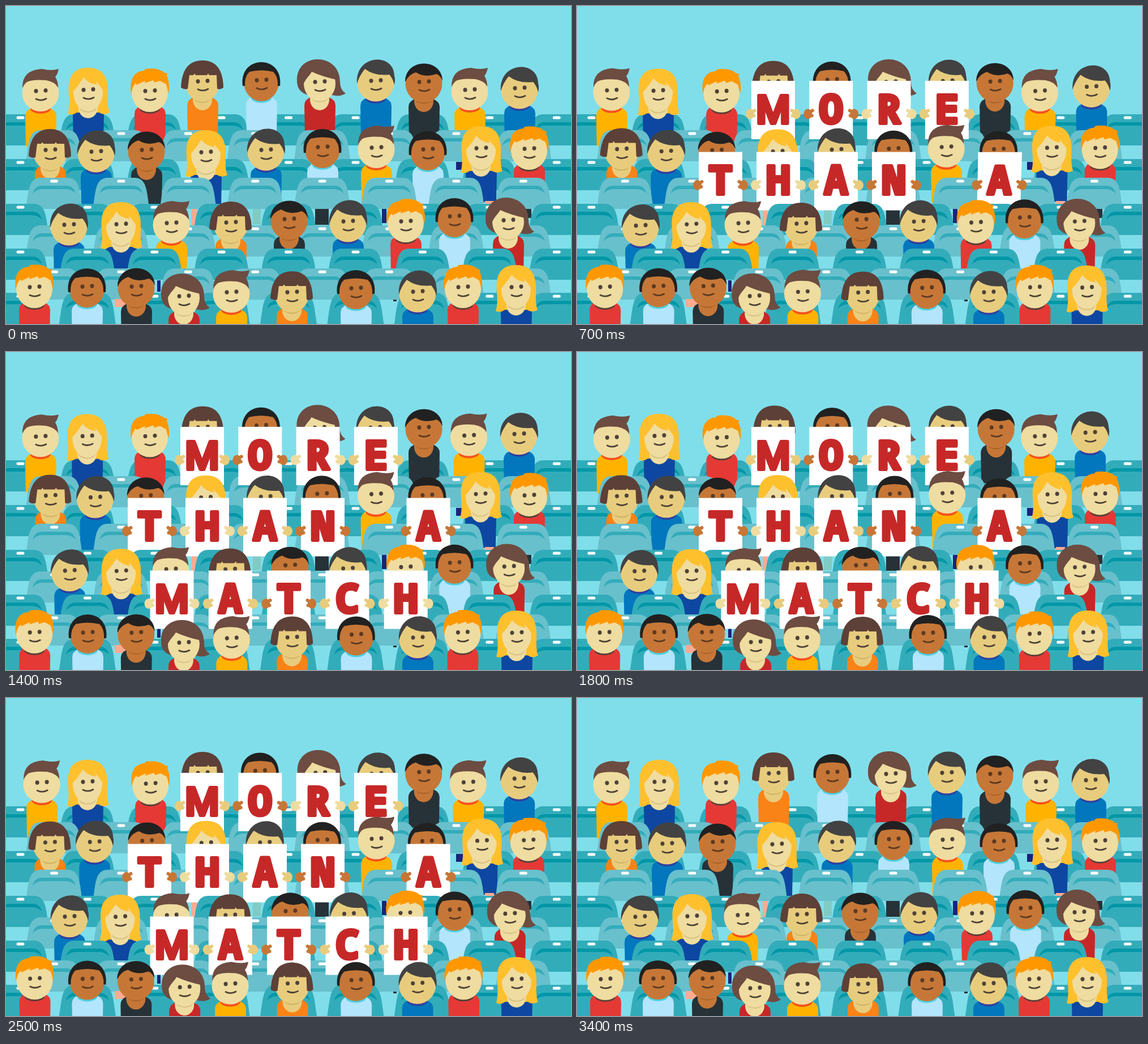
Write an HTML page that moves like this. It is 998 by 561 pixels and loops after 3.5 s.

```html
<!DOCTYPE html>
<html lang="en">
<head>
<meta charset="utf-8">
<title>Crowd with letter cards</title>
<style>
  html, body { margin: 0; width: 100%; height: 100%; overflow: hidden; background: #80deea; }
  svg { display: block; width: 100vw; height: 100vh; }
  text {
    font: bold 70px "Noto Sans Mono", monospace; text-anchor: middle;
    fill: #c62828; stroke: #c62828; stroke-width: 6; stroke-linejoin: round;
  }
  text.wide { font: 500 69px Roboto, sans-serif; }
</style>
</head>
<body>
<svg id="stage" viewBox="0 0 998 561"></svg>
<script>
const LOOP = 3500, STEP = 100, WOBBLE_LOOP = 3400, MID = 499;
const stage = document.getElementById('stage');

function add(parent, tag, attrs = {}) {
  const el = document.createElementNS('http://www.w3.org/2000/svg', tag);
  for (const key in attrs) el.setAttribute(key, attrs[key]);
  parent.appendChild(el);
  return el;
}
const path = (g, d, fill) => add(g, 'path', { d, fill });
const rect = (g, x, y, width, height, fill, rx = 0) => add(g, 'rect', { x, y, width, height, fill, rx });
const oval = (g, cx, cy, rx, ry, fill) => add(g, 'ellipse', { cx, cy, rx, ry, fill });

const PALE = '#efdca0', TAN = '#e8cc7e', BROWN = '#c67737';
const SHADE = { [PALE]: '#d8c182', [TAN]: '#cfb060', [BROWN]: '#a9622a' };

// Each look: face ellipse [cy, rx, ry], hair in front, optional hair behind, collar or bare neck.
const LOOKS = {
  swoop: {
    skin: PALE, hair: '#6d4c41', shirt: '#ffb300', collar: '#f4511e', face: [0, 32.5, 33],
    front: 'M-32-8Q-33-40 2-42Q20-38 32-42Q30-32 26-28Q31-20 31-9Q26-19 10-22Q-14-24-24-19Q-29-15-32-8Z'
  },
  blonde: {
    skin: PALE, hair: '#ffc02e', shirt: '#0d47a1', face: [3, 26, 35],
    back: 'M0-39C32-39 36-15 35 10Q34 32 38 40Q28 46 20 40H-20Q-28 46-36 42Q-32 30-34 8C-36-15-32-39 0-39Z',
    front: 'M-28 4Q-18-6-8-22Q0-11 16-9L13-16Q23-5 28 4Q31-37 0-37Q-31-37-28 4Z'
  },
  ginger: {
    skin: PALE, hair: '#ff9800', shirt: '#e53935', collar: '#5d4037', face: [4, 32, 34],
    front: 'M-33 6C-37-25-24-34-10-35L-8-38Q16-41 26-31L31-30L30-26Q36-12 33 5L29-11L18-17L8-14L6-18L-9-13L-8-17L-23-10L-25-13Q-31-6-33 6Z'
  },
  bob: {
    skin: TAN, hair: '#5d4037', shirt: '#f98316', face: [2, 30, 33],
    front: 'M-38 10Q-36-38 0-38Q36-38 37 10Q32 14 26 12L25-12H12L10-15L8-12H-12L-14-15L-16-12H-23L-26 12Q-32 14-38 10Z'
  },
  short: {
    skin: BROWN, hair: '#212121', shirt: '#b3e5fc', collar: '#4dd0e1', face: [1, 31, 34],
    front: 'M-33 8C-40-48 40-48 33 8L29 8Q30-8 21-17Q0-22-21-17Q-30-8-29 8Z'
  },
  wavy: {
    skin: PALE, hair: '#6d4c41', shirt: '#c62828', face: [3, 28, 31],
    back: 'M-40-2C-42-53 36-53 36 0Q36 14 46 20Q36 27 22 23H-20Q-40 18-40-2Z',
    front: 'M-30 8C-26-6-18-10-14-18Q6-9 30-4Q30-30 0-33Q-34-30-30 8Z'
  },
  sweep: {
    skin: TAN, hair: '#424242', shirt: '#0277bd', collar: '#303f9f', face: [0, 32.5, 33.5],
    front: 'M-33 2C-37-50 32-54 33-12Q35-5 33 4Q30-8 24-14Q-2-11-19-24Q-29-12-33 2Z'
  },
  crop: {
    skin: BROWN, hair: '#212121', shirt: '#263238', face: [0, 32.5, 33.5],
    front: 'M-33-3C-33-46 32-46 33-5Q29-15 22-17Q2-10-14-20Q-26-17-33-3Z'
  }
};

const ROWS = [
  'swoop 61 153, blonde 145 148, ginger 254 149, bob 347 134, short 451 133, wavy 554 134, sweep 653 135, crop 738 137, swoop 819 151, sweep 907 148',
  'bob 78 255, sweep 159 260, crop 248 257, blonde 353 258, sweep 459 257, short 559 251, swoop 654 253, short 745 255, blonde 839 251, ginger 924 251',
  'sweep 111 389, blonde 203 385, swoop 292 386, bob 397 383, crop 500 379, sweep 604 383, ginger 706 379, short 792 373, wavy 887 378',
  'ginger 50 495, short 143 497, crop 230 498, wavy 314 512, swoop 398 508, bob 505 506, short 618 500, sweep 727 507, ginger 807 495, blonde 901 496'
];

const kids = [], cards = [];

function drawKid(look, x, y) {
  const { skin, hair, shirt, collar, face, front, back } = LOOKS[look];
  const [cy, rx, ry] = face;
  const g = add(stage, 'g');
  path(g, 'M-26 95L-27 42Q-27 32-18 28H18Q28 32 28 42L27 95Z', shirt);
  if (back) path(g, back, hair);
  if (collar) oval(g, 0, cy + 28, 18, 9, collar);
  else {
    oval(g, 0, 31, 17, 19, skin);
    oval(g, 0, cy + ry - 7, 15, 9, SHADE[skin]);
  }
  oval(g, 0, cy, rx, ry, skin);
  path(g, front, hair);
  const ink = skin === BROWN ? '#5b3a22' : '#4e4238';
  oval(g, -8, cy - 3, 3.5, 3.7, ink);
  oval(g, 9, cy - 4, 3.5, 3.7, ink);
  add(g, 'path', { d: `M-8 ${cy + 11}q9 4.5 18-.5`, fill: 'none', stroke: ink, 'stroke-width': 2.8, 'stroke-linecap': 'round' });
  kids.push({ g, x, y, seed: kids.length * 6 + 1 });
}

function drawKids(row) {
  for (const kid of ROWS[row].split(', ')) {
    const [look, x, y] = kid.split(' ');
    drawKid(look, +x, +y);
  }
}

function drawSeats(top, dark) {
  const [fill, arc] = dark ? ['#33acba', '#0097a7'] : ['#68c0cc', '#33acba'];
  for (let x = dark ? 25.5 : 85; x < 1000; x += 118.4) {
    const g = add(stage, 'g', { transform: `translate(${x} ${top})` });
    path(g, 'M-50 55C-45 24-46 0-23 0H23C46 0 45 24 50 55Z', fill);
    path(g, 'M-38 28Q-34 14-22 14H22Q34 14 38 28Q31 20 20 20H-20Q-31 20-38 28Z', arc);
    rect(g, -7, 3.5, 14, 5, '#fff', 2.5);
  }
}

function drawCards(word, x0, gap, cy, start, skins) {
  [...word].forEach((letter, i) => {
    if (letter === ' ') return;
    const g = add(stage, 'g'), skin = skins[i];
    const sheet = add(g, 'polygon', { fill: '#fff' });
    const glyph = add(g, 'text', { y: 23, class: letter === 'M' ? 'wide' : '' });
    glyph.textContent = letter;
    const hands = [-1, 1].map(side => {
      const hand = add(g, 'g');
      oval(hand, side * 41, 0, 7.5, 9, skin);
      add(hand, 'path', { d: `M${side * 38} -3L${side * 33} -6M${side * 39} 3H${side * 34}`, stroke: skin, 'stroke-width': 6, 'stroke-linecap': 'round' });
      return hand;
    });
    cards.push({ g, sheet, glyph, hands, cx: x0 + gap * i, cy, start: start + i * 37 });
  });
}

function drawScene() {
  rect(stage, 0, 0, 998, 561, '#80deea');
  drawSeats(191, true);
  drawKids(0);
  drawSeats(219, false);
  drawCards('MORE', 346.5, 102.3, 183.5, 5, [TAN, BROWN, PALE, TAN]);
  drawSeats(270, true);
  rect(stage, 795, 275, 15, 14, '#1a237e');
  drawKids(1);
  drawSeats(303, false);
  rect(stage, 328, 358, 9, 29, '#ffab91');
  rect(stage, 436, 358, 14, 27, '#80cbc4');
  rect(stage, 546, 358, 24, 28, '#263238');
  rect(stage, 664, 358, 8, 25, '#1a237e');
  rect(stage, 846, 344, 16, 5, '#ffab91');
  rect(stage, 912, 358, 16, 16, '#263238');
  drawCards('THAN A', 253.5, 102, 309, 262, [BROWN, PALE, TAN, BROWN, '', BROWN]);
  // The last card of this row sits a little left of the even spacing.
  cards[cards.length - 1].cx = 746;
  drawSeats(349, true);
  drawSeats(387, false);
  drawKids(2);
  drawSeats(428, true);
  drawSeats(463, false);
  rect(stage, 192, 517, 22, 14, '#ffab91');
  rect(stage, 267, 484, 6, 20, '#1a237e');
  rect(stage, 684, 518, 6, 3, '#263238');
  drawCards('MATCH', 293, 103.3, 437, 903, [PALE, TAN, BROWN, TAN, PALE]);
  drawSeats(506, true);
  drawKids(3);
}

function random(n) {
  const v = Math.sin(n * 12.9898) * 43758.5453;
  return v - Math.floor(v);
}

// Sum of a few harmonics, zero at the loop point.
function wobble(seed, t) {
  return [2, 3, 5].reduce((sum, k, i) => {
    const phase = 2 * Math.PI * random(seed + i);
    return sum + 0.7 * (Math.sin(2 * Math.PI * k * t / WOBBLE_LOOP + phase) - Math.sin(phase));
  }, 0);
}

const clamp = v => Math.max(0, Math.min(1, v));

function poseCard(card, t) {
  const open = clamp((t - card.start) / 280), close = clamp((t - 2850) / 300);
  const opacity = close > 0 ? clamp((1 - close) * 2.4) : clamp(open * 1.4);
  card.g.setAttribute('display', opacity > 0 ? 'inline' : 'none');
  card.g.setAttribute('opacity', opacity);
  const angle = (close > 0 ? close : 1 - open) * Math.PI / 2;
  const squash = Math.cos(angle), tilt = Math.sin(angle) * 0.00067;
  const off = card.cx - MID;
  const drop = (50 + card.cy * 0.05) * close;
  const corner = (x, y) => {
    const zoom = 1 - y * tilt;
    return `${(off + x) * zoom - off},${y * squash * zoom}`;
  };
  card.g.setAttribute('transform', `translate(${card.cx} ${card.cy + drop})`);
  card.sheet.setAttribute('points', [corner(-38.5, -51.5), corner(38.5, -51.5), corner(38.5, 51.5), corner(-38.5, 51.5)].join(' '));
  card.glyph.setAttribute('transform', `matrix(1 0 ${-off * tilt} ${squash} 0 0)`);
  const grip = 0.4 + 0.6 * squash;
  for (const hand of card.hands) hand.setAttribute('transform', `translate(0 ${7 * squash}) scale(1 ${grip})`);
}

function render(t) {
  for (const { g, x, y, seed } of kids) {
    g.setAttribute('transform', `translate(${x + wobble(seed, t)} ${y + wobble(seed + 3, t)})`);
  }
  for (const card of cards) poseCard(card, t);
}

drawScene();
const begin = performance.now();
function tick() {
  const t = (performance.now() - begin) % LOOP;
  render(Math.floor(t / STEP) * STEP);
  requestAnimationFrame(tick);
}
tick();
</script>
</body>
</html>
```
